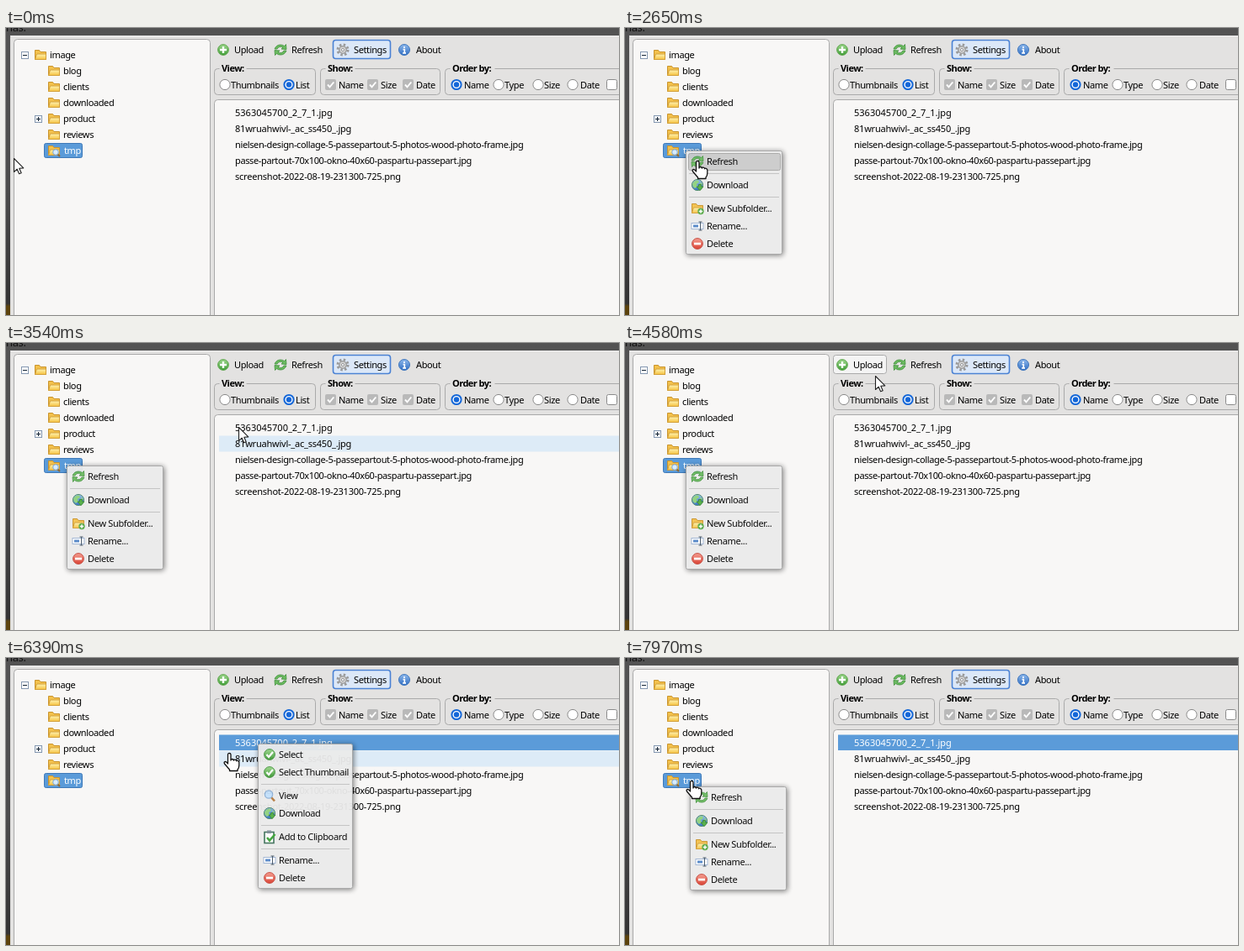
Recreate the animation shown at these times as an HTML page. Size 728 px wide and 342 px high, loop 8 s.

```html
<!DOCTYPE html>
<html lang="en">
<head>
<meta charset="utf-8">
<title>File browser context menus</title>
<style>
  html, body { margin: 0; width: 100%; height: 100%; overflow: hidden; background: #e3e2e1; }
  svg { display: block; width: 728px; height: 342px; }
  text { font: 11px "Noto Sans", "DejaVu Sans", sans-serif; letter-spacing: -.37px; fill: #000; white-space: pre; }
  .legend { font-weight: 700; letter-spacing: -.55px; }
  .digits { letter-spacing: 0; }
  .mixed { letter-spacing: -.22px; }
  .light { fill: #fff; }
  .panel { fill: #f8f7f6; stroke: #a9a9a9; }
  .group { fill: none; stroke: #aaa; }
  .menu { fill: #ebebeb; stroke: #a5a5a5; filter: drop-shadow(1px 1px 3px #0008); }
  .active { fill: #cbcbcb; stroke: #a8a8a8; }
  .hover { fill: #ddebf7; }
  .chosen { fill: #5b9bd9; }
</style>
</head>
<body>
<svg viewBox="0 0 728 342" xmlns="http://www.w3.org/2000/svg">
  <defs>
    <linearGradient id="backdrop" x2="0" y2="1">
      <stop stop-color="#535353"/><stop offset=".55" stop-color="#4c4c4c"/>
      <stop offset=".96" stop-color="#333"/><stop offset=".97" stop-color="#5c430c"/>
    </linearGradient>
    <linearGradient id="gold" x2="0" y2="1"><stop stop-color="#fff3b0"/><stop offset="1" stop-color="#f5c140"/></linearGradient>
    <linearGradient id="green" x2="0" y2="1"><stop stop-color="#9bd68a"/><stop offset="1" stop-color="#3e9b35"/></linearGradient>
    <linearGradient id="red" x2="0" y2="1"><stop stop-color="#f59a8c"/><stop offset="1" stop-color="#d93a2b"/></linearGradient>
    <linearGradient id="blue" x2="0" y2="1"><stop stop-color="#8fb9ec"/><stop offset="1" stop-color="#2f6dc2"/></linearGradient>

    <g id="folder">
      <path d="M-6.5-5.5H-1.5L0-3.5H6.5V5.5H-6.5Z" fill="#f3c14c" stroke="#c9932c"/>
      <path d="M-4.5-1H6.5V5.5H-6.5Z" fill="url(#gold)" stroke="#d3a03a"/>
    </g>
    <g id="open">
      <use href="#folder"/>
      <path d="M4 4L7 7" stroke="#8b6a3c" stroke-width="2"/>
      <circle cx="2" cy="2" r="3.3" fill="#d7ecff" stroke="#7ba5d2"/>
    </g>
    <g id="subfolder">
      <use href="#folder"/>
      <circle cx="4" cy="3.5" r="3.7" fill="#55a845"/>
      <path d="M1.8 3.5H6.2M4 1.3V5.7" stroke="#fff" stroke-width="1.4"/>
    </g>
    <g id="refresh" fill="#6bbb60" stroke="#3f8f3c" stroke-width=".8">
      <path id="half" d="M-7-1Q-5-6 0-6Q3-6 4.5-4.5L6.5-6.5 7-.5 1-1 3-3Q-2-5-4-1Z"/>
      <use href="#half" transform="rotate(180)"/>
    </g>
    <g id="download">
      <circle r="6.6" fill="url(#blue)" stroke="#4f8a68"/>
      <path d="M-6-1Q-4-6 1-5.5L2-3-1-1 0 2-3 4Q-6 2-6-1ZM3-4L6-1 4 1Z" fill="#8ed27c"/>
      <path d="M1.5-.5H4.5V2H7L3 6.7-1 2H1.5Z" fill="#52b043" stroke="#2f7d2b" stroke-width=".8"/>
    </g>
    <g id="rename">
      <rect x="-7" y="-3.5" width="14" height="7" fill="#fff" stroke="#9fb4d3"/>
      <rect x="-5" y="-1.5" width="6" height="3" fill="#5487c8"/>
      <path d="M1.5-5H5.5M1.5 5H5.5M3.5-5V5" stroke="#456"/>
    </g>
    <g id="delete">
      <circle r="6.4" fill="url(#red)" stroke="#c4473b"/>
      <rect x="-4" y="-1.3" width="8" height="2.7" fill="#fff"/>
    </g>
    <g id="tick">
      <circle r="6.4" fill="url(#green)" stroke="#4b9846"/>
      <path d="M-3.5 0L-1 3 4-3" fill="none" stroke="#fff" stroke-width="2.2"/>
    </g>
    <g id="view">
      <path d="M2 2L6 6.5" stroke="#b57a3f" stroke-width="2.6"/>
      <circle cx="-1" cy="-1.5" r="4.6" fill="#c3e0fb" stroke="#8fb2d8" stroke-width="1.4"/>
    </g>
    <g id="clipboard">
      <rect x="-6" y="-5.5" width="11" height="13" fill="#fff" stroke="#3c6f58" stroke-width="1.6"/>
      <rect x="-3" y="-7.5" width="5" height="3.5" fill="#7b8b95"/>
      <path d="M-3 1L0 4.5 6.5-3" fill="none" stroke="#3aa236" stroke-width="2.6"/>
    </g>
    <g id="upload">
      <circle r="6.4" fill="url(#green)" stroke="#63a852"/>
      <path d="M-4 0H4M0-4V4" stroke="#fff" stroke-width="2.4"/>
    </g>
    <g id="gear">
      <circle r="6" fill="none" stroke="#999" stroke-width="3" stroke-dasharray="2.4 2.31"/>
      <circle r="4.2" fill="#d5d5d5" stroke="#a0a0a0" stroke-width="1.6"/>
      <circle r="1.6" fill="#f4f6fa" stroke="#999"/>
    </g>
    <g id="info">
      <circle r="6.5" fill="url(#blue)" stroke="#3f76bd"/>
      <path d="M0-4V-2M-1.5-.5H.3V4M-1.8 3.8H2" fill="none" stroke="#fff" stroke-width="1.7"/>
    </g>
    <circle id="radio" r="6.1" fill="#fff" stroke="#8a8a8a"/>
    <g id="radio-on"><circle r="5.6" fill="#fff" stroke="#1467d8" stroke-width="2"/><circle r="3.2" fill="#1467d8"/></g>
    <rect id="box" x="-6" y="-6" width="12" height="12" rx="2" fill="#fff" stroke="#8a8a8a"/>
    <g id="box-on">
      <rect x="-6.5" y="-6.5" width="13" height="13" rx="2" fill="#b9b9b9"/>
      <path d="M-3.5 0L-1 2.8 3.8-3" fill="none" stroke="#fff" stroke-width="1.9"/>
    </g>
    <g id="minus"><rect x="-4" y="-4" width="8" height="8" fill="#fff" stroke="#8497b0"/><path d="M-2.5 0H2.5" stroke="#123"/></g>
    <g id="plus"><use href="#minus"/><path d="M0-2.5V2.5" stroke="#123"/></g>
  </defs>

  <rect width="728" height="342" fill="url(#backdrop)"/>
  <text x="0" y="4" style="font-size:13px;fill:#111">has.</text>
  <rect x="5" y="9" width="730" height="340" rx="2" fill="#e3e2e1"/>
  <path d="M5 9.5H728" stroke="#f2f2f2"/>
  <g id="stage"></g>
  <g id="cursor" stroke-linejoin="round">
    <path id="arrow" d="M.5 .5V16.5L4.2 13.2 6.6 18.8 9.2 17.7 6.8 12.2 11.8 11.9Z" fill="#fff" stroke="#222" stroke-width="1.1"/>
    <path id="hand" d="M-.5 13V2Q-.5 .5 1.2 .5T3 2V9Q3 7.5 4.6 7.5T6.3 9Q6.5 8 8 8.2T9.6 9.8Q10 9 11.2 9.3T12.8 11V15Q12.8 18 11 20V21.5H1.5V20L-4.5 13Q-5.5 11.2-4 10.6T-.5 13Z" fill="#fff" stroke="#111" stroke-width="1.3"/>
  </g>
</svg>
<script>
const LOOP = 8000;
const $ = id => document.getElementById(id);
const icon = (id, x, y) => `<use href="#${id}" x="${x}" y="${y}"/>`;
const text = (s, x, y, cls = '') => `<text x="${x}" y="${y + 4}" class="${cls}">${s}</text>`;
const rect = (x, y, w, h, cls, more = '') =>
  `<rect x="${x}" y="${y}" width="${w}" height="${h}" class="${cls}" ${more}/>`;
const during = spans => `data-on="${spans}"`;

function tree() {
  const names = ['blog', 'clients', 'downloaded', 'product', 'reviews'];
  return rect(9.5, 13.5, 233, 340, 'panel', 'rx="4"') +
    icon('minus', 22.5, 32.5) + icon('folder', 41, 32) + text('image', 52, 32) +
    names.map((s, i) => icon('folder', 57, 51 + 19 * i) + text(s, 68, 51 + 19 * i)).join('') +
    icon('plus', 38.5, 108.5) +
    rect(45.5, 137.5, 45, 17, 'chosen', 'rx="2" stroke="#3f79b8"') +
    icon('open', 57, 146) + text('tmp', 69, 146, 'light');
}

function toolbar() {
  const hot = (x, w, spans) => rect(x, 14.5, w, 22, 'button', `rx="3" fill="#f4f4f4" stroke="#aaa" ${during(spans)}`);
  return hot(247.5, 63, '3600-3760 4520-4600') + hot(314.5, 69, '4420-4520') +
    rect(388.5, 14.5, 68, 22, '', 'rx="3" fill="#dce8f8" stroke="#4b82d4" stroke-width="1.6"') +
    [['upload', 'Upload', 258, 271], ['refresh', 'Refresh', 326, 339],
     ['gear', 'Settings', 400, 413], ['info', 'About', 473, 487]]
      .map(([id, s, x, tx]) => icon(id, x, 26) + text(s, tx, 26)).join('');
}

function options() {
  const frame = (x, w, title, legendWidth) => rect(x, 48.5, w, 31, 'group', 'rx="4"') +
    rect(x + 6, 46, legendWidth, 5, '', 'fill="#e3e2e1"') + text(title, x + 8.5, 48, 'legend');
  const fields = [
    ['radio', 260, 'Thumbnails', 267], ['radio-on', 336, 'List', 344],
    ['box-on', 385.5, 'Name', 395], ['box-on', 435.5, 'Size', 445], ['box-on', 477.5, 'Date', 487],
    ['radio-on', 535, 'Name', 544], ['radio', 585, 'Type', 592],
    ['radio', 632, 'Size', 639], ['radio', 673, 'Date', 682], ['box', 719.5, '', 728]
  ];
  return frame(247.5, 120, 'View:', 32) + frame(373.5, 142, 'Show:', 35) + frame(521.5, 220, 'Order by:', 53) +
    fields.map(([id, x, s, tx]) => icon(id, x, 67.5) + text(s, tx, 68)).join('');
}

function files() {
  const rows = [
    ['5363045700_2_7_1.jpg', 'digits', '3570-3600 4650-4880'],
    ['81wruahwivl-_ac_ss450_.jpg', 'mixed', '3510-3570 6300-6430'],
    ['nielsen-design-collage-5-passepartout-5-photos-wood-photo-frame.jpg', '', '3480-3510'],
    ['passe-partout-70x100-okno-40x60-paspartu-passepart.jpg', '', '3450-3480'],
    ['screenshot-2022-08-19-231300-725.png', 'mixed', '3390-3450']
  ];
  const [name, cls] = rows[0];
  return rect(247.5, 85.5, 500, 270, 'panel', 'rx="4"') +
    rows.map(([s, c, spans], i) => {
      const y = 101 + 19 * i;
      return rect(253, y - 9.5, 475, 19, 'hover', during(spans)) + text(s, 272, y, c);
    }).join('') +
    `<g ${during('4880-8000')}>${rect(253, 91.5, 475, 18.5, 'chosen')}${text(name, 272, 101, cls + ' light')}</g>`;
}

// Items are [icon, label, hover spans]; null draws a separator.
function menu(x, y, width, items, fade) {
  let top = 3, body = '';
  for (const item of items) {
    if (!item) {
      body += `<path d="M4 ${top + 3.5}H${width - 4}" stroke="#c2c2c2"/>`;
      top += 7;
      continue;
    }
    const [id, label, spans] = item;
    if (spans) body += rect(3.5, top + .5, width - 6, 20, 'active', `rx="2" ${during(spans)}`);
    body += icon(id, 14, top + 10) + text(label, 25, top + 10);
    top += 21;
  }
  return `<g transform="translate(${x} ${y})" data-fade="${fade}">` +
    rect(.5, .5, width - 1, top + 1, 'menu', 'rx="2"') + body + '</g>';
}

const folderMenu = (spans = []) => [
  ['refresh', 'Refresh', spans[0]], null,
  ['download', 'Download', spans[1]], null,
  ['subfolder', 'New Subfolder...', spans[2]],
  ['rename', 'Rename...', spans[3]],
  ['delete', 'Delete', spans[4]]
];
const fileMenu = [
  ['tick', 'Select'], ['tick', 'Select Thumbnail'], null,
  ['view', 'View'], ['download', 'Download'], null,
  ['clipboard', 'Add to Clipboard'], null,
  ['rename', 'Rename...'], ['delete', 'Delete']
];

$('stage').innerHTML = tree() + toolbar() + options() + files() +
  menu(72, 146, 115, folderMenu(['2630-2680', '2700-2760', '2780-2840', '2850-2930', '2930-3230']), '1590 1840 4880 4880') +
  menu(299, 102, 113, fileMenu, '5110 5360 7140 7340') +
  menu(77, 153, 115, folderMenu(), '7390 7640 8000 8000');

// Cursor stops: time, x, y.
const path = [
  [0, 9, 155], [760, 9, 155], [960, 46, 157], [1160, 72, 146], [2109, 72, 146],
  [2110, 79, 146], [2620, 79, 146], [2800, 115, 218], [3030, 163, 265], [3200, 173, 268],
  [3420, 260, 176], [3540, 276, 101], [3640, 285, 28], [3780, 287, 46], [3949, 287, 46],
  [3950, 378, 49], [4360, 378, 49], [4480, 340, 27], [4560, 296, 29], [4710, 300, 102],
  [6200, 300, 102], [6400, 262, 113], [6700, 120, 150], [6940, 77, 153],
  [7809, 77, 153], [7810, 78, 152], [7960, 78, 146], [8000, 78, 146]
];
const handTimes = '960-1330 2110-3230 5830-7140 7810-8000';

const parse = s => s.split(' ').map(span => span.split('-').map(Number));
const inside = (spans, t) => spans.some(([a, b]) => t >= a && t < b);
const clamp = v => Math.max(0, Math.min(1, v));
const show = (el, on) => el.style.display = on ? '' : 'none';

const switches = [...document.querySelectorAll('[data-on]')].map(el => [el, parse(el.dataset.on)]);
switches.push([$('hand'), parse(handTimes)]);
const fades = [...document.querySelectorAll('[data-fade]')].map(el => [el, el.dataset.fade.split(' ').map(Number)]);

function cursorAt(t) {
  const i = path.findIndex(p => p[0] > t);
  const [t0, x0, y0] = path[i - 1], [t1, x1, y1] = path[i];
  const k = (t - t0) / (t1 - t0);
  return [x0 + (x1 - x0) * k, y0 + (y1 - y0) * k];
}

function render(t) {
  for (const [el, spans] of switches) show(el, inside(spans, t));
  show($('arrow'), $('hand').style.display === 'none');
  for (const [el, [a, b, c, d]] of fades) {
    const level = t < c ? clamp((t - a) / (b - a)) : d > c ? clamp((d - t) / (d - c)) : 0;
    el.style.opacity = .95 * level;
    show(el, level > 0);
  }
  $('cursor').setAttribute('transform', `translate(${cursorAt(t).map(Math.round)})`);
}

const start = performance.now();
function tick() {
  render((performance.now() - start) % LOOP);
  requestAnimationFrame(tick);
}
tick();
</script>
</body>
</html>
```
